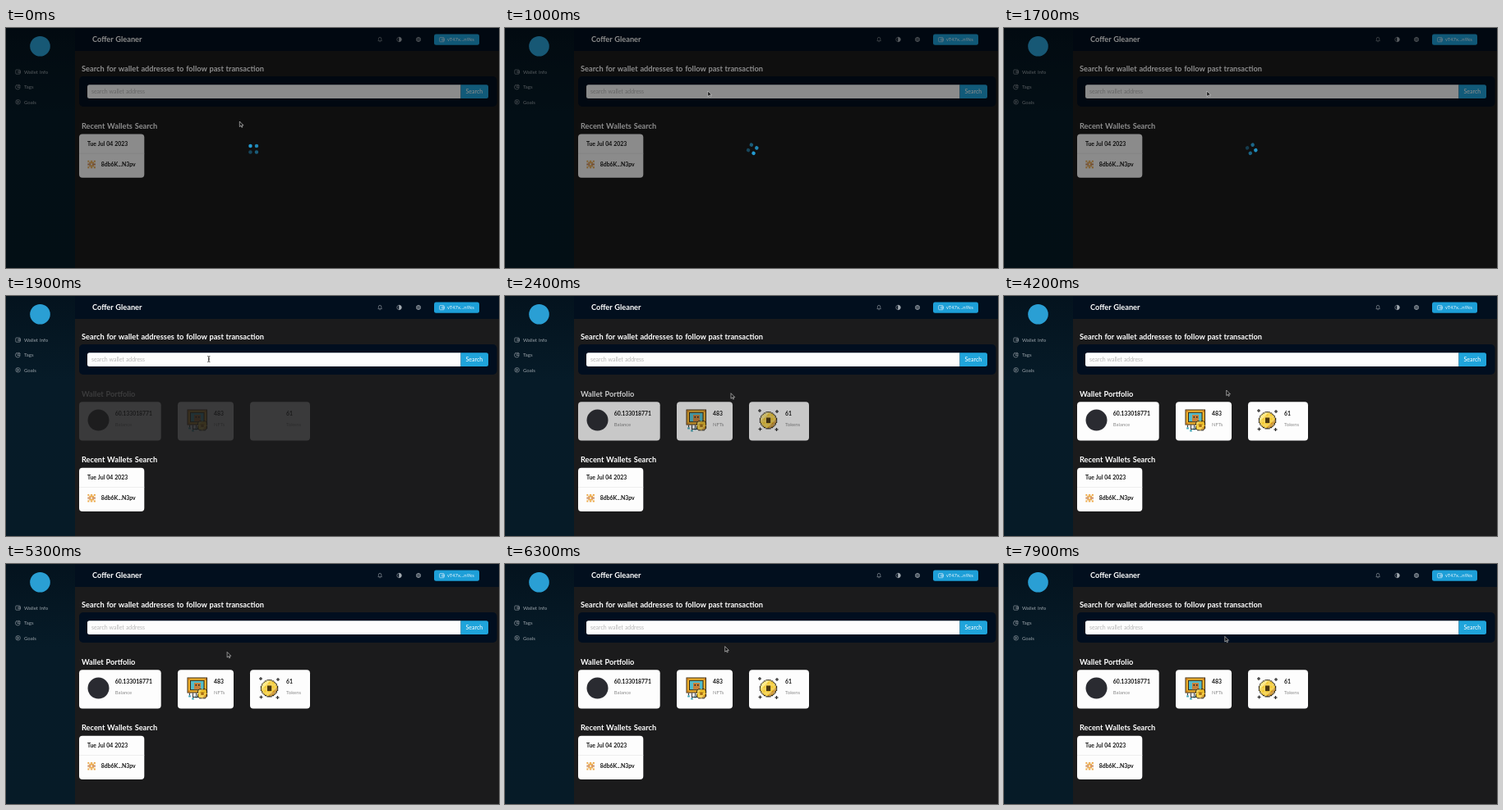
Animation of 600x293 px, one loop 8 s. Source, as an HTML page:

```html
<!DOCTYPE html>
<html lang="en">
<head>
<meta charset="utf-8">
<title>Wallet search</title>
<style>
  html, body { margin: 0; width: 100%; height: 100%; overflow: hidden; background: #1b1b1c; }
  svg { display: block; width: 100vw; height: 100vh; }
  text { font-family: Lato, "Open Sans", sans-serif; font-size: 6px; word-spacing: .06em; fill: #9aa3aa; }
  .head { font-size: 9.23px; font-weight: 700; fill: #fff; }
  .value { font-size: 6.85px; font-weight: 700; fill: #151515; }
  .label { fill: #8d8d8d; }
  .line { fill: none; stroke: #a3abb2; stroke-width: .58; }
  .card { fill: #fdfdfd; }
</style>
</head>
<body>
<svg viewBox="0 0 600 293" preserveAspectRatio="none">
  <defs>
    <linearGradient id="side" x2="0" y2="1">
      <stop stop-color="#04131e"/><stop offset=".35" stop-color="#061b28"/><stop offset="1" stop-color="#061b27"/>
    </linearGradient>
    <g id="purse" class="line">
      <rect x="-2.8" y="-2.6" width="5.4" height="5.2" rx=".7"/>
      <path d="M2.8-1H.2v2h2.6z"/>
    </g>
  </defs>
  <rect width="600" height="293" fill="#1b1b1c"/>
  <rect width="84" height="293" fill="url(#side)"/>
  <rect x="84" width="516" height="28" fill="#020f1e"/>

  <circle cx="41.5" cy="22.3" r="12.3" fill="#2a9fd4"/>
  <use href="#purse" x="14.6" y="53.6"/>
  <g class="line">
    <path d="M14 69.2a2.9 2.9 0 1 0 3.2 3.3H14zM15.4 69a2.6 2.6 0 0 1 2 2.1h-2z"/>
    <circle cx="14.6" cy="90.3" r="2.8"/><path d="M13.8 88.8l2.2 1.5-2.2 1.5z"/>
  </g>
  <text x="22" y="55.8">Wallet Info</text>
  <text x="22" y="74.1">Tags</text>
  <text x="22" y="92.5">Goals</text>

  <text class="head" x="105" y="17.4">Coffer Gleaner</text>
  <g class="line">
    <path d="M452.9 15.7c.6-.6.5-1.4.5-2.4a1.7 2 0 0 1 3.4 0c0 1 0 1.8.5 2.4zM454.5 16.7h1.2"/>
    <circle cx="478.5" cy="14" r="2.7"/><path d="M478.5 11.3a2.7 2.7 0 0 1 0 5.4z" fill="#a3abb2"/>
    <circle cx="502" cy="14" r="2.7"/><ellipse cx="502" cy="14" rx="1.2" ry="2.7"/>
    <path d="M499.4 13h5.2M499.4 15h5.2"/>
  </g>
  <rect x="521" y="7.6" width="55" height="13.2" rx="2.4" fill="#1d9fd8"/>
  <use href="#purse" x="530.5" y="14.2" style="filter:brightness(1.45)"/>
  <text x="537" y="16.4" style="fill:#e4f4fc">vT47x...n9ks</text>

  <text class="head" x="92" y="52.5">Search for wallet addresses to follow past transaction</text>
  <rect x="89" y="59" width="508.5" height="37" rx="5" fill="#010e1f"/>
  <path d="M553.5 69.2H101.5a2.5 2.5 0 0 0-2.5 2.5v11.8a2.5 2.5 0 0 0 2.5 2.5h452z" fill="#fdfdfd"/>
  <path d="M553.5 69.2h31a2.5 2.5 0 0 1 2.5 2.5v11.8a2.5 2.5 0 0 1-2.5 2.5h-31z" fill="#1fa4db"/>
  <text x="104" y="80" style="font-size:6.9px;fill:#b7b7b7">search wallet address</text>
  <text x="559.6" y="80" style="font-size:7px;fill:#fff">Search</text>

  <g id="portfolio">
    <text class="head" x="92" y="122.7">Wallet Portfolio</text>
    <rect class="card" x="89" y="129.3" width="99.7" height="47.2" rx="4"/>
    <rect class="card" x="209" y="129.3" width="68" height="47.2" rx="4"/>
    <rect class="card" x="297" y="129.3" width="73" height="47.2" rx="4"/>
    <circle cx="112.5" cy="151.6" r="13" fill="#2a2b31"/>
    <g id="nft"></g>
    <g id="coin"></g>
    <text class="value" x="132.7" y="145.7">60.133018771</text>
    <text class="label" x="132.7" y="158.6">Balance</text>
    <text class="value" x="253" y="145.7">483</text>
    <text class="label" x="253" y="158.6">NFTs</text>
    <text class="value" x="341" y="145.7">61</text>
    <text class="label" x="341" y="158.6">Tokens</text>
  </g>

  <g id="recent">
    <text class="head" x="92" y="202.8">Recent Wallets Search</text>
    <rect class="card" x="89" y="209.7" width="79.3" height="53.2" rx="4"/>
    <path d="M89 233.5h79.3" stroke="#e9e9e9" stroke-width=".7"/>
    <text class="value" x="99" y="223.9">Tue Jul 04 2023</text>
    <g id="avatar"></g>
    <text class="value" x="115.8" y="249.1">8db6K...N3pv</text>
  </g>

  <rect id="shade" width="600" height="293" opacity=".45"/>
  <g id="spinner" fill="#25a6e0"></g>
  <g id="arrow">
    <path d="M0 0v6.6l1.6-1.4 1 2.2 1-.5-1-2.1h2.1z" fill="#111" stroke="#e0e0e0" stroke-width=".6"/>
  </g>
  <path id="beam" d="M-1.6-3.6q1.6 0 1.6 1v5.2q0 1-1.6 1M1.6-3.6Q0-3.6 0-2.6v5.2q0 1 1.6 1M-.9 0H.9" fill="none" stroke="#333" stroke-width=".8"/>
</svg>
<script>
const LOOP = 8000, LOADED = 1790, FADE = 800;
const $ = id => document.getElementById(id);

function add(parent, tag, attrs) {
  const el = document.createElementNS('http://www.w3.org/2000/svg', tag);
  for (const key in attrs) el.setAttribute(key, attrs[key]);
  parent.append(el);
  return el;
}
const box = (parent, x, y, width, height, fill) => add(parent, 'rect', { x, y, width, height, fill });

// Stepped disc with a dark rim and a shaded lower right.
function pixelDisc(parent, cx, cy, r, cell) {
  const n = Math.ceil(r / cell);
  for (let j = -n; j <= n; j++) for (let i = -n; i <= n; i++) {
    const d = Math.hypot(i, j) * cell;
    if (d > r) continue;
    const fill = d > r - cell ? '#2c2413' : i + j > n * .75 ? '#c98a16' : i + j < -n * .75 ? '#ffe977' : '#f4c92c';
    box(parent, cx + (i - .5) * cell, cy + (j - .5) * cell, cell + .05, cell + .05, fill);
  }
}

function drawNft(g) {
  box(g, 220.5, 138.5, 24.5, 19, '#3a2a12');
  box(g, 221.5, 139.5, 22.5, 17, '#eeb02e');
  box(g, 224, 141.8, 17.5, 12.4, '#3a2a12');
  box(g, 225, 142.8, 15.5, 10.4, '#52bccb');
  box(g, 229, 145, 8, 8.2, '#c8813a');
  box(g, 230.5, 147, 1.6, 1.6, '#222');
  box(g, 234, 147, 1.6, 1.6, '#222');
  for (const x of [221.5, 242]) for (const y of [139.5, 154.5]) box(g, x, y, 2, 2, '#c97820');
  [[223, 3], [227, 6], [231, 4]].forEach(([x, h]) => {
    box(g, x, 157.5, 1, h, '#333');
    box(g, x - .8, 157.5 + h, 2.6, 2, '#3aa6b8');
  });
  box(g, 227, 162, 7, 1, '#333');
  pixelDisc(g, 239, 158.3, 6.6, 1.1);
  box(g, 237.3, 156.6, 3.4, 3.4, '#a86d14');
}

function drawCoin(g) {
  pixelDisc(g, 320.5, 151.8, 10.6, 1.25);
  box(g, 318, 148.5, 5.2, 6.6, '#4a3610');
  for (const [x, y] of [[310, 140], [331, 141], [310.5, 162.5], [330.5, 163]]) {
    box(g, x - .6, y - 2, 1.2, 4, '#2b2b2b');
    box(g, x - 2, y - .6, 4, 1.2, '#2b2b2b');
  }
}

function drawAvatar(g) {
  const rows = ['101', '011', '110', '011', '101'];
  rows.forEach((row, j) => {
    for (let i = 0; i < 5; i++) {
      const on = row[Math.min(i, 4 - i)] === '1';
      box(g, 99.4 + i * 1.9, 242 + j * 1.9, 1.9, 1.9, on ? (j === 2 ? '#c98358' : '#eda743') : '#f5ead9');
    }
  });
}

drawNft($('nft'));
drawCoin($('coin'));
drawAvatar($('avatar'));
const dots = [[-1, -1], [1, -1], [1, 1], [-1, 1]].map(([x, y]) =>
  add($('spinner'), 'circle', { cx: x * 3.75, cy: y * 3.75, r: 2.25 }));

// Pointer stops: time, x, y.
const path = [
  [0, 284.3, 114], [100, 284.3, 114], [900, 246.8, 77], [1900, 246.8, 77],
  [2400, 275, 118.7], [4200, 270.7, 115], [6300, 267.7, 100.6],
  [7900, 268.8, 88.4], [8000, 268.8, 88.4]
];
const smooth = k => k * k * (3 - 2 * k);

function pointerAt(t) {
  const i = path.findIndex(stop => stop[0] > t), a = path[i - 1], b = path[i];
  let k = (t - a[0]) / (b[0] - a[0]);
  if (t < 2400) k = smooth(k);
  return [1, 2].map(n => a[n] + (b[n] - a[n]) * k);
}

function draw(t) {
  const loading = t < LOADED;
  $('shade').style.display = $('spinner').style.display = loading ? '' : 'none';
  $('recent').setAttribute('transform', `translate(0 ${loading ? -80.2 : 0})`);
  $('portfolio').setAttribute('opacity', Math.min(1, Math.max(0, (t - LOADED) / FADE)));
  $('coin').setAttribute('opacity', t < 2000 ? 0 : 1);

  $('spinner').setAttribute('transform', `translate(301.2 147.8) rotate(${t * .3})`);
  dots.forEach((dot, i) => {
    const phase = ((t + 1100 - i * 400) / 1000 + 2) % 2;
    dot.setAttribute('opacity', .3 + .7 * (1 - Math.abs(phase - 1)));
  });

  const [x, y] = pointerAt(t);
  const typing = !loading && y < 86;
  $('arrow').style.display = typing ? 'none' : '';
  $('beam').style.display = typing ? '' : 'none';
  for (const id of ['arrow', 'beam']) $(id).setAttribute('transform', `translate(${x} ${y})`);
}

const start = performance.now();
function tick() {
  draw((performance.now() - start) % LOOP);
  requestAnimationFrame(tick);
}
tick();
</script>
</body>
</html>
```
